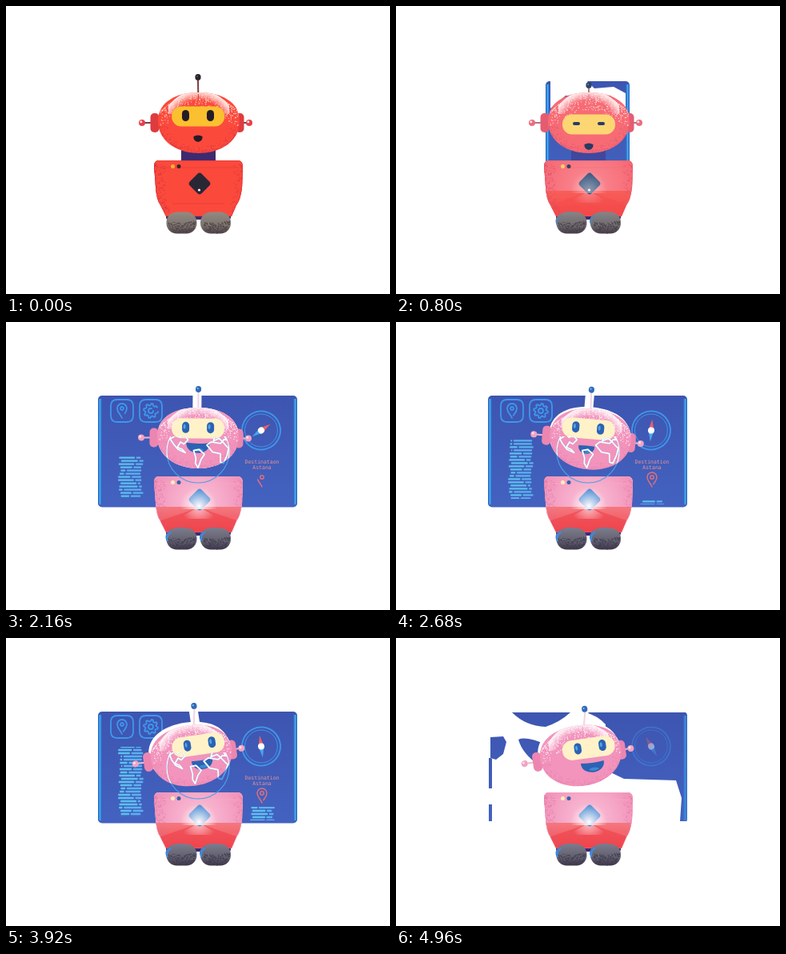
These frames come from a looping animation (480x360 px, 5 s). An HTML page with a canvas:

```html
<!DOCTYPE html>
<html lang="en">
<head>
<meta charset="utf-8">
<title>Robot navigator</title>
<style>
html, body { margin: 0; width: 100%; height: 100%; overflow: hidden; background: #fff; }
canvas { display: block; width: 480px; height: 360px; }
</style>
</head>
<body>
<canvas id="stage" width="480" height="360"></canvas>
<script>
const c = document.getElementById('stage').getContext('2d');
const LOOP = 5000, BLUE = '#3f97ec';

const clamp = x => Math.max(0, Math.min(1, x));
const smooth = x => (x = clamp(x), x * x * (3 - 2 * x));
const ramp = (t, a, b) => smooth((t - a) / (b - a));
const noise = n => { const s = Math.sin(n * 127.1 + 3.7) * 43758.5453; return s - Math.floor(s); };

// Rows are [time, ...values]; returns the eased values at t.
function track(t, rows) {
  let i = 0;
  while (i < rows.length - 2 && t > rows[i + 1][0]) i++;
  const a = rows[i], b = rows[i + 1], k = ramp(t, a[0], b[0]);
  return a.slice(1).map((v, j) => v + (b[j + 1] - v) * k);
}

const mix = (a, b, k) => {
  const ch = (h, i) => parseInt(h.substr(1 + i * 2, 2), 16);
  return `rgb(${[0, 1, 2].map(i => Math.round(ch(a, i) + (ch(b, i) - ch(a, i)) * k))})`;
};

// time, centre x, centre y, tilt, face x, face y, eye height, smile, ear reach
const POSES = [
  [0, 241, 146, 0, -1, -9, 14, 0, 0],
  [320, 238, 146, 0, 0, -6, 14, 0, 12],
  [560, 240, 146, 0, 0, -4, 13, 0, 3],
  [800, 241, 146, 0, 0, 1, 4, 0, 0],
  [1000, 241, 146, 0, 0, 2, 12, 0, 0],
  [1520, 241, 146, 0, 0, 2, 12, 0, 0],
  [2160, 240, 145, .5, 0, -13, 14, 1, 0],
  [3200, 246, 148, 9.5, -8, -14.4, 14, 0, 0],
  [3920, 232, 147, -8.4, 12, -13, 14, .85, 0],
  [4960, 231, 147, -8.2, 13, -9, 14, 1, 0]
];
const NEEDLE = [[1400, 60], [2160, 55], [3200, -45], [3920, -8], [4960, -30]];
const SPIN = [[1300, -85], [1520, -75], [2160, -42], [3200, -37], [3920, -36], [4960, -30]];

const HEAD = new Path2D('M-51-2C-51-27-27-38 0-38S51-27 51-2C51 23 27 38 0 38S-51 23-51-2Z');
const TORSO = new Path2D('M190 193H291Q296 194 296 201L295 228Q293 243 288 249L282 263H200L193 249Q188 243 187 226L185 200Q185 194 190 193Z');
const PIN = new Path2D('M0 9C-2 4-6 2-6-3A6 6 0 1 1 6-3C6 2 2 4 0 9Z');
const REMNANT = 'M145 93H218Q205 105 187 111Q162 110 145 93ZM118 124L134 123L138 130L134 145L125 152L118 150Z' +
  'M153 127Q162 122 190 134L200 120L250 115V160H180Q158 145 153 127ZM237 93H364V229H355L357 200L350 178L285 176L262 165V108Q252 97 237 93Z' +
  'M116 150H120V188H116ZM116 208H120V229H116Z';
const ERASED = new Path2D('M110 88H370V234H110Z' + REMNANT);
const EARLY_GAP = new Path2D('M193 91H236L248 103L272 101L287 109V134L268 112H212L193 128Z');

// Simplified coastlines as longitude, latitude pairs.
const LANDS = [
  [-120, 24, -95, 32, -82, 27, -74, 33, -62, 22, -70, 14, -78, 18, -84, 8, -72, 4, -66, -2, -82, 4, -96, 14],
  [-50, 2, -40, 4, -30, -5, -36, -14, -38, -20, -42, -31, -47, -22, -46, -12],
  [-25, 12, -16, 18, 6, 15, 14, 19, 26, 10, 38, 6, 28, -6, 20, -22, 8, -20, 4, -4, -14, -1],
  [-10, 20, -4, 30, 8, 34, 22, 30, 34, 33, 40, 22, 22, 23, 14, 19, 6, 25]
];

function fill(path, style) { c.fillStyle = style; c.fill(path); }
function ellipse(x, y, rx, ry, style) {
  c.fillStyle = style; c.beginPath(); c.ellipse(x, y, rx, ry, 0, 0, 7); c.fill();
}
function box(x, y, w, h, r, style) {
  c.fillStyle = style; c.beginPath(); c.roundRect(x, y, w, h, r); c.fill();
}
function line(x1, y1, x2, y2, style, width) {
  c.strokeStyle = style; c.lineWidth = width;
  c.beginPath(); c.moveTo(x1, y1); c.lineTo(x2, y2); c.stroke();
}
function layer(draw, x = 0, y = 0) { c.save(); c.translate(x, y); draw(); c.restore(); }
function gradient(x0, y0, x1, y1, ...stops) {
  const g = c.createLinearGradient(x0, y0, x1, y1);
  stops.forEach(([at, col]) => g.addColorStop(at, col));
  return g;
}
function glow(x, y, r, rgb, alpha) {
  const g = c.createRadialGradient(x, y, 0, x, y, r);
  g.addColorStop(0, `rgba(${rgb},${alpha})`);
  g.addColorStop(1, `rgba(${rgb},0)`);
  return g;
}
function trace(path, p, length = 120) {
  if (p <= 0) return;
  c.setLineDash([p * length, length]);
  c.stroke(path);
  c.setLineDash([]);
}

function textLines(x, y0, y1, w, shift, seed) {
  c.save();
  c.beginPath(); c.rect(x, y0, w, y1 - y0); c.clip();
  for (let i = 0; i < 32; i++) {
    const y = 136 + i * 4 - shift, cut = 5 + noise(i + seed) * (w - 12);
    const start = noise(i * 3 + seed) * 4, end = w - noise(i * 7 + seed) * 4;
    box(x + start, y, cut - start, 2.4, 1, '#5cc0ee');
    box(x + cut + 1.5, y, end - cut - 1.5, 2.4, 1, '#5ab2ee');
  }
  c.restore();
}

function label(word, y, t, start) {
  const p = ramp(t, start, start + 1100);
  const shown = [...word].map((ch, i) =>
    noise(i + 4) * .9 < p ? ch : 'aeonsitr'[Math.floor(noise(i * 9 + Math.floor(t / 80)) * 8)]).join('');
  c.globalAlpha *= ramp(t, start - 100, start + 250);
  c.fillText(shown, 320, y);
}

function compass(t) {
  layer(() => {
    const p = ramp(t, 1420, 2200);
    c.strokeStyle = BLUE;
    [[24, 1.8], [20.5, 1]].forEach(([r, w]) => {
      c.lineWidth = w;
      c.beginPath(); c.arc(0, 0, r, -.5, -.5 + 6.284 * p); c.stroke();
    });
    c.rotate(track(t, NEEDLE)[0] * Math.PI / 180);
    const s = ramp(t, 1350, 1650);
    c.scale(s, s);
    fill(new Path2D('M-3.5 0L0-14L3.5 0Z'), '#e9606b');
    fill(new Path2D('M-3.5 0L0 14L3.5 0Z'), '#47a5ef');
    ellipse(0, 0, 4, 4, '#fff');
  }, 319, 135.5);
}

function interfaceParts(t) {
  const fade = 1 - ramp(t, 4520, 4900);
  c.lineCap = 'round';
  layer(() => {
    c.globalAlpha = .4 + .6 * fade;
    compass(t);
  });
  c.globalAlpha = fade;
  c.strokeStyle = BLUE;
  c.lineWidth = 1.8;
  [[145, 1380], [181, 1460]].forEach(([x, start], i) => layer(() => {
    const frame = new Path2D('M14 0V6Q14 14 6 14H-6Q-14 14-14 6V-6Q-14-14-6-14H6Q14-14 14-6V0');
    trace(frame, ramp(t, start, start + 520), 104);
    const p = ramp(t, start + 200, start + 900);
    if (i) {
      const gear = new Path2D();
      for (let k = 0; k <= 32; k++) {
        const a = (k + .5) * Math.PI / 16, r = k % 4 < 2 ? 9 : 6.8;
        gear.lineTo(Math.cos(a) * r, Math.sin(a) * r);
      }
      trace(gear, p, 76);
    } else trace(PIN, p, 42);
    c.beginPath(); c.arc(0, i ? 0 : -3, i ? 3 : 2, 0, 6.3 * p); c.stroke();
  }, x, 111));

  const [top, bottom] = track(t, [[1400, 190, 190], [1520, 185, 195], [2160, 167, 219], [3000, 137, 222], [4960, 135, 223]]);
  const shift = (t - 1400) / 100 % 4;
  textLines(140, top, bottom, 32, shift, 2);
  const p = ramp(t, 2400, 3100);
  textLines(304, 228 - 17 * p, 228, 32, shift, 40);

  c.fillStyle = '#e69396';
  c.font = '6.5px "DejaVu Sans Mono", monospace';
  c.textAlign = 'center';
  layer(() => label('Destination', 177, t, 1400));
  layer(() => label('Astana', 184, t, 1450));
  layer(() => {
    c.strokeStyle = '#e06f7d';
    c.lineWidth = 1.5;
    trace(PIN, ramp(t, 1900, 2700), 42);
    c.beginPath(); c.arc(0, -3, 2.2, 0, 6.3 * ramp(t, 1900, 2200)); c.stroke();
  }, 320, 197);
}

function panel(t, pose) {
  if (t < 560) return;
  const [half, top] = track(t, [[560, 22, 192], [800, 50, 94], [1100, 122, 92]]);
  const left = 239.5 - half, right = 239.5 + half;
  box(left - 2.5, top, half * 2 + 5, 231.5 - top, 5, gradient(0, 92, 0, 231, [0, '#3d55b0'], [1, '#4362c0']));
  if (t < 1050) layer(() => {
    c.globalAlpha = 1 - ramp(t, 880, 1050);
    fill(EARLY_GAP, '#fff');
  });
  if (t > 1200) layer(() => interfaceParts(t));
  if (t > 2050) layer(() => {
    c.globalAlpha = ramp(t, 2050, 2160);
    c.rotate(pose[2] * Math.PI / 180);
    const s = ramp(t, 2100, 3200);
    c.save();
    c.translate(-2 * s, -4 * s);
    fill(HEAD, '#fff');
    c.restore();
    box(pose[3] - 7, -57, 11, 24, 3, '#fff');
  }, pose[0], pose[1]);
  if (t > 4600) layer(() => {
    c.globalAlpha = ramp(t, 4600, 4940);
    c.fillStyle = '#fff';
    c.fill(ERASED, 'evenodd');
  });
  const bars = () => [left, right].forEach(x => {
    line(x, top + 4, x, 228, '#2c6cc4', 5);
    line(x, top + 4, x, 228, '#48a5ef', 2);
  });
  if (t < 4600) layer(bars);
  else layer(() => line(right, 97, right, 228, '#3984d8', 3.5));
}

function specks(count, seed, place, style) {
  c.fillStyle = style;
  for (let i = 0; i < count; i++) {
    const [x, y] = place(noise(i + seed), noise(i * 2 + seed + 500));
    c.fillRect(x, y, 1, 1);
  }
}

function body(lit) {
  layer(() => {
    c.globalAlpha = 1 - lit;
    box(219, 178, 43, 18, 3, mix('#3f2a70', '#3a49a4', lit));
  });
  box(200, 255, 81, 12, 3, '#3c2c70');
  layer(() => {
    c.clip(TORSO);
    c.fillStyle = gradient(0, 231, 0, 263, [0, mix('#fb493c', '#f5787f', lit)], [1, mix('#fb493c', '#f04b52', lit)]);
    c.fillRect(180, 190, 120, 75);
    c.fillStyle = mix('#fb493c', '#f293ba', lit);
    c.fillRect(180, 190, 120, 41);
    if (lit) {
      c.fillStyle = glow(241, 226, 58, '255,222,234', .65 * lit);
      c.fillRect(180, 190, 120, 41);
    }
    c.strokeStyle = mix('#d7343c', '#f3a5bd', lit);
    c.lineWidth = 1.2;
    c.stroke(TORSO);
    c.globalAlpha = .75;
    specks(170, 20, (a, b) => [185 + a * a * 14 + Math.max(0, b - .6) * 20, 196 + b * 62], mix('#c22d45', '#d96f9f', lit));
    specks(110, 80, (a, b) => [295 - a * a * 11 - Math.max(0, b - .6) * 20, 196 + b * 62], mix('#d5343e', '#e27ba2', lit));
    line(189, 202, 291, 202, mix('#e13f39', '#f7abc8', lit), .8);
    c.globalAlpha = 1;
    if (lit) {
      fill(new Path2D('M241 232L188 250V263H294V250Z'), `rgba(238,62,72,${.55 * lit})`);
      fill(new Path2D('M241 231L214 246H268Z'), glow(241, 232, 22, '255,215,222', .8 * lit));
    } else line(208, 247, 273, 247, '#e83f39', 1);
  });
  ellipse(208.5, 200.5, 2.5, 2.5, mix('#f7b32b', '#fff0bd', lit));
  ellipse(216, 200.5, 2.5, 2.5, mix('#33242d', '#3762aa', lit));
  layer(() => {
    c.rotate(Math.PI / 4);
    box(-10.5, -10.5, 21, 21, 4, mix('#2a2735', '#4287d1', lit));
  }, 242, 222);
  ellipse(241.5, 230, 1.6, 1.6, '#fff');
  if (lit) layer(() => {
    c.beginPath(); c.rect(205, 196, 74, 38); c.clip();
    ellipse(241, 230, 26, 26, glow(241, 230, 23, '255,250,252', lit));
  });
  [219.5, 262].forEach((x, i) => {
    if (lit) ellipse(x - 2, 269, 18, 12, mix('#857d76', '#3f86dc', lit));
    box(x - 19, 257.5, 38, 27, 13, gradient(0, 257, 0, 285, [0, mix('#938b82', '#7d7c8c', lit)], [.6, mix('#7c746e', '#62606f', lit)], [1, mix('#4d4148', '#3f3448', lit)]));
    specks(160, 130 + i * 90, (a, b) => {
      const r = Math.sqrt(b) * .96, q = a * 3.6 - .25;
      return [x + Math.cos(q) * r * 18, 271 + Math.sin(q) * r * 13];
    }, mix('#4b3e44', '#3e3c50', lit));
    if (lit) layer(() => {
      c.globalAlpha = lit;
      c.strokeStyle = '#3e8ce0'; c.lineWidth = 2;
      c.beginPath(); c.ellipse(x, 271, 18, 12.5, 0, 2.9, 3.9); c.stroke();
    });
  });
}

function head(pose, lit) {
  const [x, y, tilt, fx, fy, eyeH, smile, reach] = pose;
  const skin = mix('#fb4a3c', '#f294bc', lit), dark = mix('#231c26', '#2b62b4', lit);
  layer(() => {
    c.rotate(tilt * Math.PI / 180);
    [-1, 1].forEach(side => {
      const ex = side * (67 + reach) - 4;
      line(side * 54, 0, ex, 0, mix('#6c4451', '#f2b6cf', lit), 2);
      ellipse(ex, 0, 4, 4, mix('#e8404a', '#f2a3c2', lit));
      ellipse(ex - 1.2, -1.2, 1.5, 1.5, '#ffe3e6');
      box(side * 53 - 7.5, -12, 11, 24, 5, mix('#df3b3e', '#ec86b0', lit));
    });
    const by = -48 + fy;
    line(fx * .6, -28 + fy * .3, fx, by + 4, mix('#7d3c3f', '#f4d3e3', lit), 2);
    ellipse(fx, by, 3.6, 4, mix('#29232c', '#326ab8', lit));
    ellipse(fx - 1, by - 1, 1.1, 1.1, mix('#57505a', '#78c1f1', lit));

    fill(HEAD, skin);
    layer(() => {
      c.clip(HEAD);
      const shine = glow(0, 6, 47, '255,246,248', 0);
      shine.addColorStop(.72, 'rgba(255,246,248,0)');
      shine.addColorStop(.98, 'rgba(255,246,248,.95)');
      c.fillStyle = shine;
      c.fillRect(-38, -39, 76, 28);
      specks(420, 300, (a, b) => {
        const px = (a - .5) * 98;
        return [px, -38 + px * px / 100 + b * b * 22];
      }, mix('#ffdcd0', '#fff4fa', lit));
      c.globalAlpha = .75;
      specks(260, 800, (a, b) => {
        const q = .1 + a * 2.95, r = 1 - b * b * .2;
        return [Math.cos(q) * 50 * r, Math.sin(q) * 37 * r];
      }, mix('#d93540', '#e47fae', lit));
    });
    line(fx * .6, -36, fx * .5, -27 + fy * .2, mix('#c84843', '#f4b3ce', lit), 1);

    const vx = fx * .85, vy = fy + 1;
    box(vx - 33, vy - 12.5, 66, 25, 12, mix('#fac02f', '#fff2c9', lit));
    [-15.5, 15.5].forEach(ex => {
      box(fx + ex - 4.5, fy - eyeH / 2, 9, eyeH, Math.min(4.5, eyeH / 2), dark);
      if (eyeH > 8 && lit) ellipse(fx + ex - 1.5, fy - 1, 1.5, 3, mix('#231c26', '#51a5e0', lit));
    });

    const w = 5.5 + smile * 9, my = fy + 29 - smile * 4;
    c.fillStyle = dark;
    c.beginPath();
    c.moveTo(fx - w, my - 3 - smile * 3);
    c.quadraticCurveTo(fx, my - 6 + smile * 2, fx + w, my - 3 - smile * 3);
    c.bezierCurveTo(fx + w + 1, my + 6 + smile * 5, fx - w - 1, my + 6 + smile * 5, fx - w, my - 3 - smile * 3);
    c.fill();
    if (smile > .3) ellipse(fx + 1, my + 3, 6 * smile, 2, '#3f88cd');
  }, x, y);
}

function globe(t, pose) {
  const p = ramp(t, 1250, 2050), alpha = 1 - ramp(t, 4450, 4800);
  if (!p || !alpha) return;
  const turn = track(t, SPIN)[0], rad = Math.PI / 180, R = 39;
  const rim = new Path2D(), coast = new Path2D();
  rim.arc(0, 0, R, Math.PI / 2 - Math.PI * p, Math.PI / 2 + Math.PI * p);
  LANDS.forEach(points => {
    const land = new Path2D();
    for (let i = 0; i < points.length; i += 2) {
      const lon = Math.max(-90, Math.min(90, points[i] - turn)) * rad, lat = points[i + 1] * rad;
      land.lineTo(Math.sin(lon) * Math.cos(lat) * R, -Math.sin(lat) * R);
    }
    land.closePath();
    coast.addPath(land);
  });
  const draw = color => layer(() => {
    c.beginPath(); c.rect(-42, -19, 84, 62); c.clip();
    c.globalAlpha = alpha * ramp(t, 1250, 1500);
    c.strokeStyle = color;
    c.lineJoin = 'round';
    c.lineWidth = 1.2;
    c.stroke(rim);
    c.lineWidth = 1.8;
    c.stroke(coast);
  }, 240, 162);
  draw('#4c9fe8');
  c.save();
  const clip = new Path2D();
  clip.addPath(HEAD, new DOMMatrix().translate(pose[0], pose[1]).rotate(pose[2]));
  c.clip(clip);
  draw('#fff');
  c.restore();
}

function render(t) {
  const pose = track(t, POSES), lit = ramp(t, 500, 1150);
  c.fillStyle = '#fff';
  c.fillRect(0, 0, 480, 360);
  panel(t, pose);
  body(lit);
  head(pose, lit);
  globe(t, pose);
}

function tick() {
  render(performance.now() % LOOP);
  requestAnimationFrame(tick);
}
tick();
</script>
</body>
</html>
```
